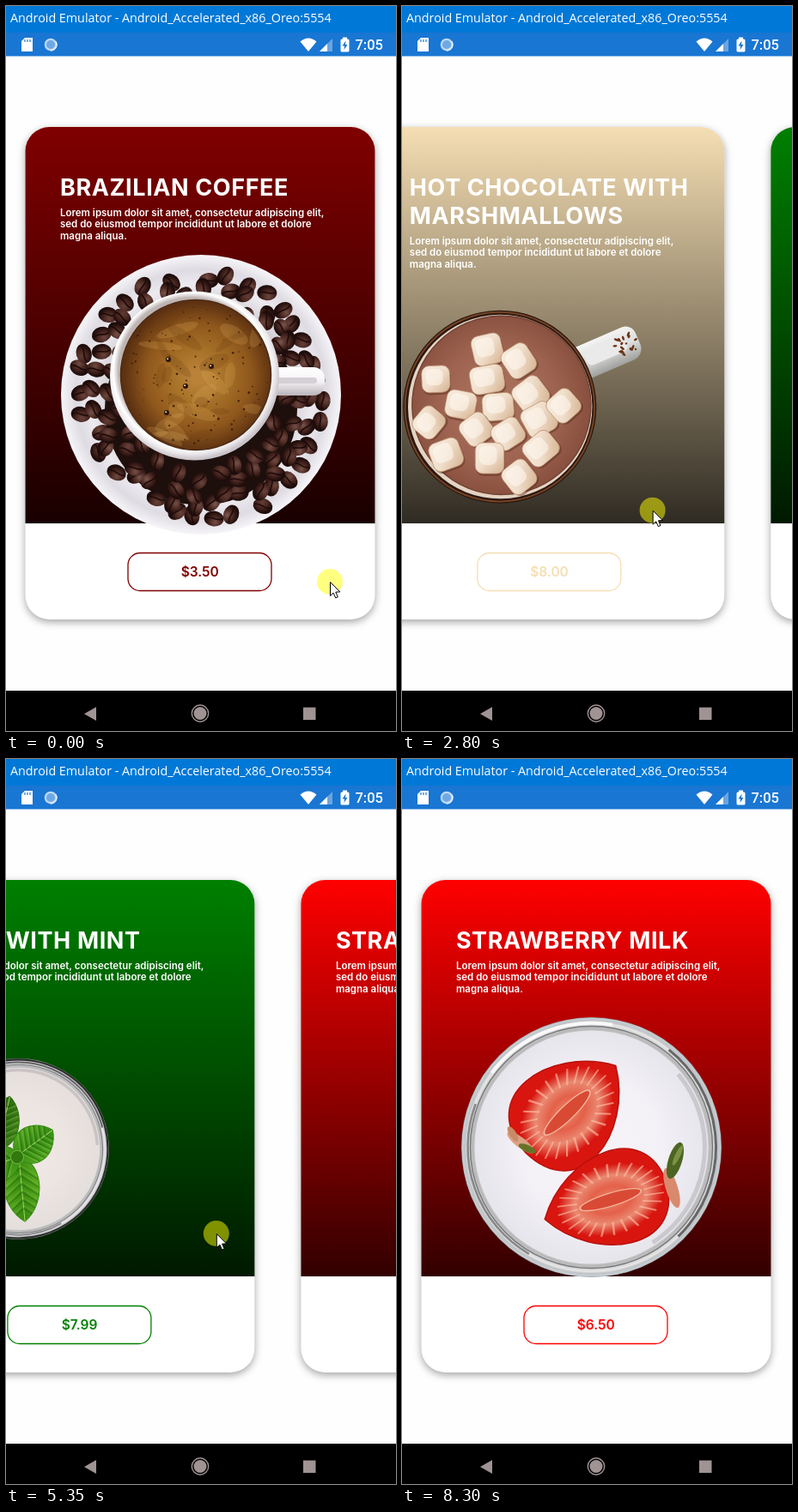
An HTML page with a canvas that plays this animation: 454 by 845 pixels, repeating every 8.45 s.

```html
<!DOCTYPE html>
<html lang="en">
<head>
<meta charset="utf-8">
<title>Drinks carousel</title>
<style>
html, body { margin: 0; width: 100%; height: 100%; overflow: hidden; background: #fefefe; }
canvas { display: block; }
</style>
</head>
<body>
<canvas id="stage" width="454" height="845"></canvas>
<script>
const ctx = document.getElementById('stage').getContext('2d');
const LOOP = 8450, PITCH = 461, TAU = Math.PI * 2;

// Rows are [time, value, ...]; values between rows are interpolated.
const scrollKeys = [
  [150, 0], [500, 110], [720, 230], [850, 370], [950, 440], [1100, 461],
  [2360, 461], [2800, 515], [3260, 598], [3340, 640], [3480, 805], [3600, 897], [3720, 922],
  [4680, 922], [5000, 984], [5350, 1062], [5700, 1103], [6050, 1145], [6290, 1222],
  [6430, 1342], [6520, 1373], [6750, 1383]
];
const cursorKeys = [
  [150, 377, 671], [720, 113, 668], [1490, 113, 668], [2020, 373, 599], [2360, 372, 598],
  [3260, 208, 577], [3340, 173, 576], [4050, 173, 576], [4120, 335, 564], [4350, 393, 563],
  [4680, 393, 563], [5350, 245, 553], [6050, 92, 549], [6290, 36, 561],
  [7540, 36, 561], [8300, 352, 846]
];
const presses = [[0, 790], [2250, 3310], [4580, 6300]];

function sample(keys, t) {
  const next = keys.findIndex(k => k[0] > t);
  if (next === 0) return keys[0].slice(1);
  if (next < 0) return keys[keys.length - 1].slice(1);
  const a = keys[next - 1], b = keys[next], u = (t - a[0]) / (b[0] - a[0]);
  return a.slice(1).map((v, i) => v + (b[i + 1] - v) * u);
}

function rand(n) {
  const v = Math.sin(n * 12.9898 + 4.1) * 43758.5453;
  return v - Math.floor(v);
}

function paint(fill, stroke, width = 1) {
  if (fill) { ctx.fillStyle = fill; ctx.fill(); }
  if (stroke) { ctx.strokeStyle = stroke; ctx.lineWidth = width; ctx.stroke(); }
}
function disc(x, y, r, fill, stroke, width) { oval(x, y, r, r, 0, fill, stroke, width); }
function oval(x, y, rx, ry, angle, fill, stroke, width) {
  ctx.beginPath();
  ctx.ellipse(x, y, rx, ry, angle, 0, TAU);
  paint(fill, stroke, width);
}
function arc(x, y, r, from, to, stroke, width) {
  ctx.beginPath();
  ctx.arc(x, y, r, from, to);
  paint(null, stroke, width);
}
function box(x, y, w, h, r, fill, stroke, width) {
  ctx.beginPath();
  ctx.roundRect(x, y, w, h, r);
  paint(fill, stroke, width);
}
function shape(points, fill, stroke, width) {
  ctx.beginPath();
  points.forEach(p => ctx.lineTo(...p));
  ctx.closePath();
  paint(fill, stroke, width);
}
function line(x0, y0, x1, y1, stroke, width) {
  ctx.beginPath();
  ctx.moveTo(x0, y0);
  ctx.lineTo(x1, y1);
  paint(null, stroke, width);
}
function blend(gradient, colors) {
  colors.forEach((c, i) => gradient.addColorStop(i / (colors.length - 1), c));
  return gradient;
}
const radial = (x, y, r0, r1, ...colors) => blend(ctx.createRadialGradient(x, y, r0, x, y, r1), colors);
const linear = (x0, y0, x1, y1, ...colors) => blend(ctx.createLinearGradient(x0, y0, x1, y1), colors);

function text(str, x, y, font, color, align = 'left', spacing = 0) {
  ctx.font = font;
  ctx.fillStyle = color;
  ctx.textAlign = align;
  ctx.letterSpacing = spacing + 'px';
  ctx.fillText(str, x, y);
}
function at(x, y, angle, draw) {
  ctx.save();
  ctx.translate(x, y);
  ctx.rotate(angle);
  draw();
  ctx.restore();
}

function bean(x, y, angle, seed) {
  at(x, y, angle, () => {
    const tone = rand(seed) * 26;
    oval(0, 0, 11.5, 9, 0, radial(-2, -4, 1, 12, `rgb(${92 + tone},${56 + tone},${48 + tone})`, '#4a2721', '#1f0d0b'));
    ctx.beginPath();
    ctx.moveTo(-10, 1);
    ctx.bezierCurveTo(-4, -4, 3, 4, 10, -1);
    paint(null, '#1c0b09', 1.6);
  });
}

function coffee() {
  disc(227, 453, 163, radial(227, 453, 95, 163, '#c9c5cb', '#d9d6dc', '#eceaef', '#dedbe2', '#f6f5f8'));
  disc(227, 470, 112, '#1d0f0c');
  [[138, 36], [124, 32], [108, 28], [93, 24]].forEach(([radius, count], ring) => {
    for (let i = 0; i < count; i++) {
      const seed = ring * 50 + i, angle = i / count * TAU + rand(seed) * .1;
      const edge = ring === 0 && (rand(seed + 7) < .2 || angle > 1.9 && angle < 2.6);
      if (edge) continue;
      const r = radius + rand(seed + 300) * 14 - 5;
      bean(227 + r * Math.cos(angle), 455 + r * Math.sin(angle), rand(seed + 600) * TAU, seed);
    }
  });
  box(300, 421, 71, 33, 13, linear(0, 421, 0, 454, '#ffffff', '#f5f3f6', '#b9b3b8'));
  box(314, 433, 48, 7, 4, '#d5d0d5');
  disc(219.5, 431, 98.5, radial(216, 425, 85, 103, '#bdb5b3', '#ffffff', '#ece9ec', '#c9c4c9'));
  disc(221, 430, 87.5, radial(224, 432, 8, 88, '#b98238', '#a56e26', '#8f571c', '#5b3011'), '#4d2a14', 1.5);
  ctx.save();
  ctx.beginPath();
  ctx.arc(221, 430, 85, 0, TAU);
  ctx.clip();
  ctx.globalAlpha = .22;
  for (let i = 0; i < 30; i++) {
    oval(145 + rand(i) * 150, 355 + rand(i + 40) * 150, 8 + rand(i + 80) * 18, 3 + rand(i + 90) * 6,
      rand(i + 120) * 3 - 1.5, i % 2 ? '#e0ad5c' : '#6b3d10');
  }
  ctx.globalAlpha = 1;
  for (let i = 0; i < 110; i++) {
    const angle = rand(i + 200) * TAU, r = 84 * Math.sqrt(rand(i + 400));
    disc(221 + r * Math.cos(angle), 432 + r * Math.sin(angle), .5 + rand(i + 500) * .9, '#44220b');
  }
  ctx.restore();
  [[189, 412], [239, 420], [209, 443], [187, 474]].forEach(([x, y]) => {
    disc(x, y, 3, '#2c1408');
    disc(x - .8, y - .8, 1, '#f3dfc0');
  });
}

const marshmallows = [
  [124, 387], [202, 378], [234, 408], [93, 436], [141, 431], [186, 414], [185, 453], [231, 455],
  [147, 469], [97, 484], [183, 491], [228, 490], [265, 486], [148, 511], [215, 526], [174, 549]
];

function chocolate() {
  box(300, 421, 90, 46, [4, 14, 16, 4], linear(0, 421, 0, 467, '#f4f4f2', '#dcdedd', '#9fa09d'));
  box(316, 428, 58, 24, 8, '#e9eae9');
  for (let i = 0; i < 20; i++) {
    oval(355 + rand(i) * 32, 429 + rand(i + 30) * 28, 1 + rand(i + 60) * 2.6, 1.5, rand(i) * 3, '#6b3216');
  }
  disc(187, 454, 127.5, '#2b1810');
  disc(187, 454, 125, null, '#7a4525', 2);
  disc(187.5, 454, 121.5, '#e4d3c2');
  disc(190, 453, 118, radial(187, 450, 40, 119, '#a66d59', '#9d6350', '#8a5140'), '#6f4030', 1.5);
  marshmallows.forEach(([x, y], i) => at(x, y, rand(i + 3) * 1.2 - .6, () => {
    const w = 37 + rand(i + 20) * 8, h = 35 + rand(i + 50) * 6;
    box(-w / 2 + 1, -h / 2 + 3, w, h, 10, 'rgba(85,40,25,.45)');
    box(-w / 2, -h / 2, w, h, 10, linear(-w / 2, -h / 2, w / 2, h / 2, '#f8eddf', '#f0decb', '#d4b18f'), '#b98d6c', .8);
    box(-w / 2 + 5, -h / 2 + 4, w * .62, h * .62, 8, 'rgba(255,250,243,.55)');
  }));
}

function glass(x, y, milk, dark) {
  disc(x, y, 151.5, radial(x, y, 132, 151, '#dfdcdc', '#b7b7b8', '#e8e8e9', '#8e8f91'));
  disc(x, y, 149.5, null, dark, 3);
  disc(x, y, 141, null, '#77797b', 1.5);
  arc(x, y, 145, -.9, .8, 'rgba(50,50,52,.7)', 3);
  arc(x, y, 144, 2.1, 3.5, 'rgba(60,60,62,.55)', 2.5);
  arc(x, y, 145, -2.5, -1.4, 'rgba(255,255,255,.8)', 4);
  disc(x, y, 136, milk);
  arc(x, y, 132, -.7, 1, 'rgba(150,145,148,.35)', 5);
}

function leaf(x0, y0, x1, y1, width, light, dark) {
  const len = Math.hypot(x1 - x0, y1 - y0), h = width * .66;
  at(x0, y0, Math.atan2(y1 - y0, x1 - x0), () => {
    ctx.beginPath();
    ctx.moveTo(0, 0);
    ctx.bezierCurveTo(len * .1, -h, len * .75, -h, len, 0);
    ctx.bezierCurveTo(len * .75, h, len * .1, h, 0, 0);
    paint(linear(0, -h, 0, h, light, dark, light), dark, 1.5);
    ctx.save();
    ctx.clip();
    line(0, 0, len, 0, '#a5d465', 1.4);
    for (let i = 1; i < 7; i++) for (const side of [-1, 1]) {
      line(len * i / 8, 0, len * (i / 8 + .2), side * h * .72, 'rgba(170,215,95,.5)', 1);
      line(len * (i / 8 + .05), 0, len * (i / 8 + .25), side * h * .72, 'rgba(25,75,5,.4)', 2);
    }
    ctx.restore();
  });
}

function mint() {
  glass(222, 452, radial(222, 452, 20, 136, '#f0e9e6', '#ece5e2', '#e4dedc'), '#2b2d2d');
  leaf(205, 422, 291, 396, 52, '#4f9420', '#2d6b10');
  leaf(211, 459, 122, 522, 60, '#68b827', '#388b10');
  leaf(212, 460, 146, 401, 60, '#5cae25', '#358a12');
  leaf(209, 455, 278, 486, 62, '#5db326', '#368c14');
  disc(209, 457, 11, '#32780f', '#6fb53c', 1.5);
}

function strawberry(x, y, angle, len, width) {
  at(x, y, angle, () => {
    ctx.beginPath();
    ctx.moveTo(0, 0);
    ctx.bezierCurveTo(len * .02, -width * .76, len * .72, -width * .62, len, 0);
    ctx.bezierCurveTo(len * .72, width * .62, len * .02, width * .76, 0, 0);
    paint('#d8160f', '#b80f0b', 1.5);
    ctx.save();
    ctx.clip();
    ctx.translate(len * .46, 0);
    ctx.scale(1, width / len * .9);
    disc(0, 0, len * .42, radial(0, 0, 5, len * .42, '#e98263', '#e4604a', '#ea8a72', '#d8160f'));
    for (let i = 0; i < 26; i++) {
      const a = i / 26 * TAU, c = Math.cos(a) * len, s = Math.sin(a) * len;
      line(c * .27, s * .27, c * .43, s * .43, 'rgba(255,190,165,.65)', 2.5);
    }
    oval(0, 0, len * .25, len * .08, 0, '#d94a35', '#f3b59c', 2);
    ctx.restore();
  });
}

function strawberries() {
  glass(220.5, 452.5, radial(220, 452, 30, 136, '#f6f3f8', '#f3f0f6', '#e6e5ec'), '#c3cbd0');
  strawberry(144, 459, -.77, 146, 115);
  oval(138, 447, 19, 6, .65, '#dba184');
  oval(129, 437, 10, 4, 1, '#c88b68');
  oval(146, 454, 11, 4, .4, '#667326');
  strawberry(308, 494, 2.85, 148, 106);
  oval(314, 500, 7, 24, -.3, '#d9896d');
  oval(318, 468, 8, 22, .3, '#4c6522');
  oval(321, 462, 3, 13, .45, '#7d9144');
}

const cards = [
  { color: '#800000', title: ['BRAZILIAN COFFEE'], price: '$3.50', drink: coffee },
  { color: '#f5deb3', title: ['HOT CHOCOLATE WITH', 'MARSHMALLOWS'], price: '$8.00', drink: chocolate },
  { color: '#008000', title: ['MILK WITH MINT'], price: '$7.99', drink: mint },
  { color: '#ff0000', title: ['STRAWBERRY MILK'], price: '$6.50', drink: strawberries }
];
const blurb = [
  'Lorem ipsum dolor sit amet, consectetur adipiscing elit,',
  'sed do eiusmod tempor incididunt ut labore et dolore',
  'magna aliqua.'
];

function drawCard({ color, title, price, drink }, offset) {
  const p = offset / PITCH;
  ctx.save();
  ctx.translate(offset, 0);
  ctx.save();
  ctx.shadowColor = 'rgba(0,0,0,.36)';
  ctx.shadowBlur = 10;
  ctx.shadowOffsetY = 3;
  box(22.5, 141, 407, 574, 28, '#fff');
  ctx.restore();
  box(22.5, 141, 407, 462, [28, 28, 0, 0], linear(0, 141, 0, 715, color, '#000'));
  title.forEach((row, i) => text(row, 63, 221 + i * 32.5, '700 27px Inter, sans-serif', '#fff', 'left', .6));
  const top = 244.5 + (title.length - 1) * 33;
  blurb.forEach((row, i) => text(row, 63, top + i * 13.6, '600 11.5px Inter, sans-serif', '#fff'));
  box(142, 637.5, 167, 44, 14, null, color, 1.3);
  text(price, 225.7, 664.5, '600 15.5px Inter, sans-serif', color, 'center');
  ctx.restore();

  // The drink moves half a page further than its card while it turns and shrinks.
  ctx.save();
  ctx.translate(226 + offset + p * PITCH / 2, 452);
  ctx.rotate(p * 198 * Math.PI / 180);
  ctx.scale(1 - Math.abs(p), 1 - Math.abs(p));
  ctx.translate(-226, -452);
  drink();
  ctx.restore();
}

function drawSystemBars() {
  ctx.fillStyle = '#0078d7';
  ctx.fillRect(0, 0, 454, 31);
  ctx.fillStyle = '#1976d2';
  ctx.fillRect(0, 31, 454, 27.5);
  text('Android Emulator - Android_Accelerated_x86_Oreo:5554', 5, 19, '14.3px "Open Sans", sans-serif', '#fff');
  text('7:05', 439, 51, '500 16.5px Roboto, sans-serif', '#fff', 'right');

  shape([[22, 37], [31, 37], [31, 53], [18, 53], [18, 41]], '#fff');
  for (const x of [22, 25, 28]) line(x, 39, x, 42, '#1976d2', 1.2);
  disc(52, 45, 6.2, '#6fa9e5', '#bcd8f3', 2.2);
  arc(52, 45, 7, -.6, 1.6, '#e9f2fb', 1.4);

  ctx.beginPath();
  ctx.moveTo(352, 53);
  ctx.lineTo(342.5, 41.5);
  ctx.quadraticCurveTo(352, 33.5, 361.5, 41.5);
  ctx.closePath();
  paint('#fff');
  shape([[380, 38], [380, 53], [365, 53]], 'rgba(255,255,255,.35)');
  shape([[374, 44], [374, 53], [365, 53]], '#fff');
  box(392, 36.5, 5, 3, 0, '#fff');
  box(389.5, 38.5, 10, 15, 1.5, '#fff');
  shape([[395.5, 40.5], [391.5, 46.5], [394, 46.5], [393.5, 51], [397.5, 45], [395, 45]], '#1976d2');

  ctx.fillStyle = '#000';
  ctx.fillRect(0, 798, 454, 47);
  const gray = '#a09393';
  shape([[91, 825], [105, 817], [105, 833]], gray);
  disc(226, 824.5, 7.5, gray);
  disc(226, 824.5, 9.7, null, gray, 1.4);
  box(346, 817.5, 14.5, 14.5, 0, gray);
}

function drawCursor(t) {
  if (t >= 8300) return;
  const [x, y] = sample(cursorKeys, t);
  if (presses.some(([from, to]) => t >= from && t < to)) disc(x, y, 15, 'rgba(255,255,0,.5)');
  at(x + .5, y + .5, 0, () => shape(
    [[0, 0], [0, 16], [3.6, 12.6], [6.2, 18.4], [8.8, 17.3], [6.3, 11.6], [11.3, 11.4]], '#fff', '#000', 1));
}

function frame(now) {
  const t = now % LOOP, [scroll] = sample(scrollKeys, t);
  ctx.fillStyle = '#fefefe';
  ctx.fillRect(0, 0, 454, 845);
  cards.forEach((card, i) => {
    const offset = i * PITCH - scroll;
    if (Math.abs(offset) < PITCH) drawCard(card, offset);
  });
  drawSystemBars();
  drawCursor(t);
}

const start = performance.now();
function tick() {
  frame(performance.now() - start);
  requestAnimationFrame(tick);
}
tick();
</script>
</body>
</html>
```
